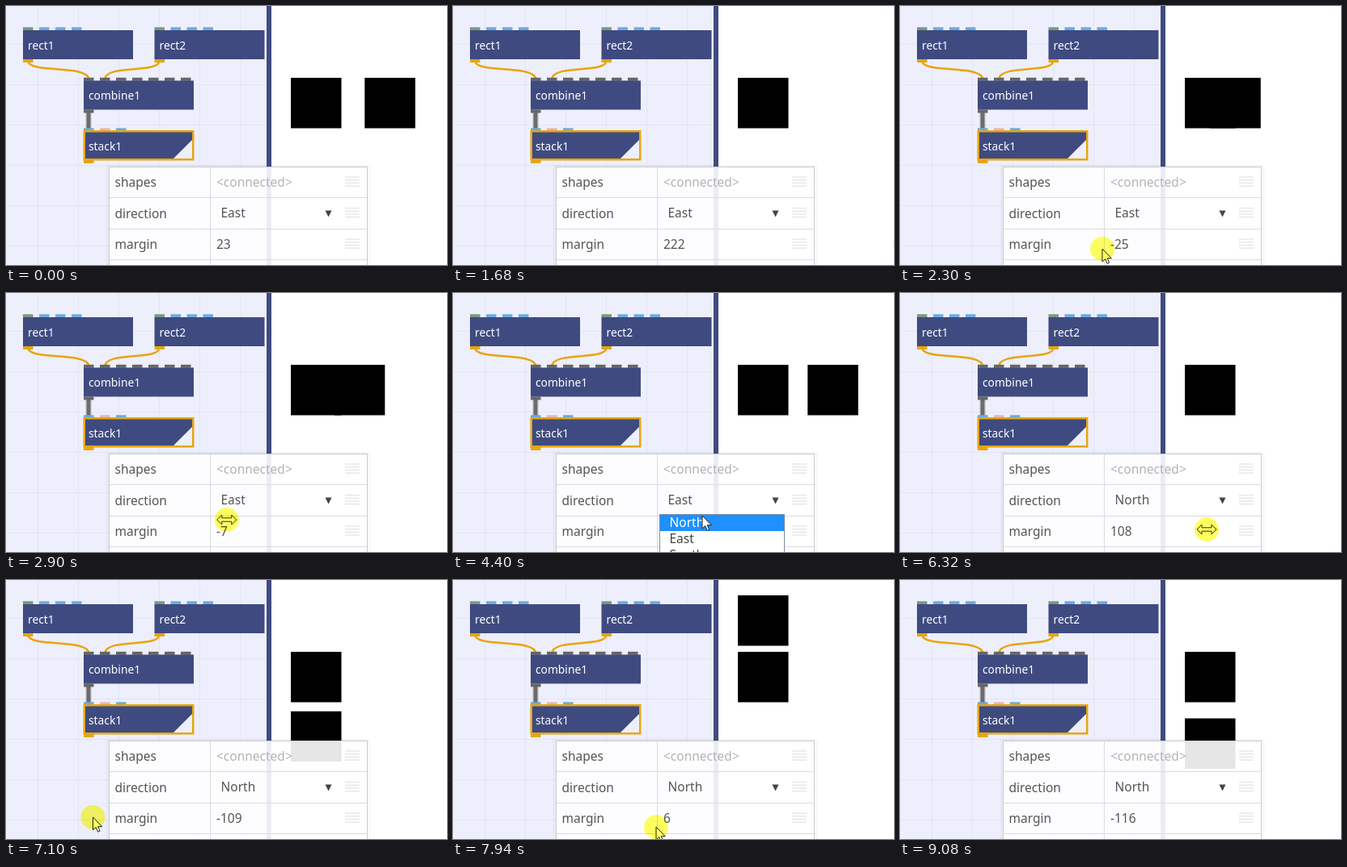
An HTML page that plays this animation: 545 px wide and 321 px high, repeating every 9470 ms.

```html
<!DOCTYPE html>
<html lang="en">
<head>
<meta charset="utf-8">
<title>Stack node</title>
<style>
  html, body { margin: 0; width: 100%; height: 100%; overflow: hidden; background: #fff; }
  svg { display: block; }
  text { font-family: "Noto Sans", "Open Sans", sans-serif; font-size: 15.5px; fill: #555; }
  .name { font-size: 13.8px; font-weight: 500; fill: #fff; }
  #halo { mix-blend-mode: multiply; }
</style>
</head>
<body>
<svg id="stage" width="545" height="321" viewBox="0 0 545 321">
  <rect width="545" height="321" fill="#fff"/>
  <rect x="352" y="89" width="62.5" height="62.5"/>
  <rect id="second" width="62.5" height="62.5"/>
  <g id="network"></g>
  <g id="panel"></g>
  <g id="menu"></g>
  <path id="arrow" d="M0 0V16L3.7 12.6L6.1 18.3L8.6 17.2L6.2 11.7H11.3Z" fill="#fff" stroke="#222"/>
  <path id="scrub" d="M-12 0L-6 -6V-2.2H6V-6L12 0L6 6V2.2H-6V6Z" fill="#fff" stroke="#333"/>
  <circle id="halo" r="15" fill="#ffff62"/>
</svg>
<script>
const LOOP = 9470, TICKS = 124, TICK = LOOP / TICKS;
const UNIT = 1.25, SIDE = 62.5;
const NODE = '#3f4b80', GOLD = '#e6a60f', GREY = '#666', BLUE = '#69ace0',
      GREEN = '#7b987c', PINK = '#e6b8b6', PAPER = '#eeeffc';
const $ = id => document.getElementById(id);

function add(parent, tag, attrs, label) {
  const el = document.createElementNS('http://www.w3.org/2000/svg', tag);
  for (const key in attrs) el.setAttribute(key, attrs[key]);
  if (label !== undefined) el.textContent = label;
  parent.appendChild(el);
  return el;
}
const box = (g, x, y, width, height, fill, more) =>
  add(g, 'rect', { x, y, width, height, fill, ...more });
const line = (g, d, stroke, width = 1) =>
  add(g, 'path', { d, stroke, fill: 'none', 'stroke-width': width });
const write = (g, x, y, label, more) => add(g, 'text', { x, y, ...more }, label);

function node(g, x, y, label, inputs, output) {
  inputs.forEach((color, i) => box(g, x + 20 * i, y - 3.7, 12.5, 4, color));
  box(g, x, y + 36, 12.5, 4, output);
  box(g, x, y, 136, 36, NODE);
  write(g, x + 6, y + 23.7, label, { class: 'name' });
}

function drawNetwork(g) {
  box(g, 0, 0, 328, 321, PAPER);
  for (let x = 39.5; x < 322; x += 50) line(g, `M${x} 0V321`, '#e3e5f2');
  for (let y = 47.5; y < 321; y += 50) line(g, `M0 ${y}H322`, '#e3e5f2');
  box(g, 322, 0, 6, 321, NODE);
  line(g, 'M102 130V153', '#d3d4dc', 8);
  line(g, 'M102 130V153', '#6b6b6b', 5);
  line(g, 'M27.3 68C27.3 84 102 72 102.3 91', GOLD, 2.5);
  line(g, 'M189.3 68C189.3 84 122.5 72 122.3 91', GOLD, 2.5);
  const shape = [GREEN, BLUE, BLUE, BLUE];
  node(g, 21, 30, 'rect1', shape, GOLD);
  node(g, 183.5, 30, 'rect2', shape, GOLD);
  node(g, 96, 92.5, 'combine1', Array(7).fill(GREY), GREY);
  node(g, 96, 155, 'stack1', [BLUE, PINK, BLUE], GOLD);
  add(g, 'path', { d: 'M207 189L231 165V189Z', fill: PAPER });
  box(g, 96.75, 155.25, 134.5, 35, 'none', { stroke: GOLD, 'stroke-width': 2.5 });
}

function drawPanel(g) {
  for (let i = 3; i > 0; i--)
    box(g, 127 - i, 199 - i / 2, 320 + 2 * i, 130, 'none', { stroke: '#000', 'stroke-opacity': 0.025 });
  box(g, 127.5, 199.5, 319, 130, '#fff', { 'fill-opacity': 0.9, stroke: '#c9c9cd' });
  line(g, 'M128 237.5H446M128 276.5H446M128 314.5H446M252.5 200V321', '#dcdce0');
  ['shapes', 'direction', 'margin'].forEach((label, i) => {
    const y = 224 + 38.5 * i;
    write(g, 134.5, y, label);
    for (let j = 0; j < 4; j++) line(g, `M419 ${y - 12 + 3.7 * j}h18`, '#e3e3e3', 1.2);
  });
  write(g, 260, 224, '<connected>', { style: 'fill:#b4b4b4' });
  add(g, 'path', { d: 'M394.5 253.5H402.5L398.5 261.5Z', fill: '#444' });
  return { direction: write(g, 265.5, 262, ''), margin: write(g, 260, 301, '') };
}

function drawMenu(g) {
  box(g, 255.5, 274.5, 154, 82, '#fff', { stroke: '#7b8ba5' });
  return ['North', 'East', 'South'].map((label, i) => ({
    bar: box(g, 256, 275 + 20 * i, 153, 20, '#1e90ff'),
    text: write(g, 267.5, 290 + 20 * i, label)
  }));
}

// Pointer path: tick, x, y
const PATH = [
  [4, 378, 302], [7, 283, 308], [9, 310, 299], [11, 310, 299], [12, 306, 297],
  [16, 151.5, 296], [22, 559, 295], [23, 559, 295], [30, 250, 301], [36, 111, 286],
  [38, 272.75, 281], [42, 305.25, 283], [47, 305.25, 283], [50, 307, 261], [57, 307, 261],
  [58, 308, 276], [60, 307, 284], [68, 307, 284], [74, 267.75, 294], [78, 267.75, 294],
  [83, 379, 293], [84, 379, 293], [95, 81.5, 294], [96, 81.5, 294], [101, 300, 305],
  [102, 300, 305], [104, 251, 306], [114, 99, 303], [116, 99, 303], [117, 324, 314]
];
// Each drag starts at a pointer x with a margin value
const DRAGS = [{ from: 11, to: 45, x: 310, margin: 23 }, { from: 76, to: 115, x: 267.75, margin: 19 }];
const CLICKS = [{ from: 52, to: 54 }, { from: 62, to: 64 }];

// Monotone cubic through the path points
function along(k, axis) {
  const last = PATH.length - 1;
  if (k <= PATH[0][0]) return PATH[0][axis];
  if (k >= PATH[last][0]) return PATH[last][axis];
  const i = PATH.findIndex(p => p[0] > k) - 1;
  const secant = j => j < 0 || j >= last ? 0 :
    (PATH[j + 1][axis] - PATH[j][axis]) / (PATH[j + 1][0] - PATH[j][0]);
  const slope = j => {
    const a = secant(j - 1), b = secant(j);
    return a * b <= 0 ? 0 : 2 * a * b / (a + b);
  };
  const p = PATH[i], q = PATH[i + 1], h = q[0] - p[0], u = (k - p[0]) / h;
  const e = u * u * (3 - 2 * u);
  return p[axis] * (1 - e) + q[axis] * e +
    h * u * (1 - u) * ((1 - u) * slope(i) - u * slope(i + 1));
}

function marginAt(k) {
  const drag = k < DRAGS[1].from ? DRAGS[0] : DRAGS[1];
  const x = along(Math.max(drag.from, Math.min(k, drag.to)), 1);
  return drag.margin + Math.round((x - drag.x) / UNIT);
}

drawNetwork($('network'));
const fields = drawPanel($('panel'));
const options = drawMenu($('menu'));
const show = (el, on) => el.setAttribute('visibility', on ? 'visible' : 'hidden');
const move = (el, x, y) => el.setAttribute('transform', `translate(${x} ${y})`);

function render(ms) {
  const k = Math.floor(ms / TICK + 0.4);
  const x = along(k, 1), y = along(k, 2);
  const margin = marginAt(k), north = k >= 64;
  const offset = SIDE + margin * UNIT;
  move($('second'), north ? 352 : 352 + offset, north ? 89 - offset : 89);
  fields.direction.textContent = north ? 'North' : 'East';
  fields.margin.textContent = margin;

  $('menu').style.display = k >= 53 && k < 64 ? '' : 'none';
  const hover = k < 58 ? 1 : 0;
  options.forEach((option, i) => {
    option.bar.setAttribute('fill-opacity', i === hover ? 1 : 0);
    option.text.style.fill = i === hover ? '#fff' : '#444';
  });

  const visible = k >= 4 && k < 119;
  const choosing = k >= 48 && k < 69;
  const inField = !choosing && x > 252 && x < 447 && y > 276;
  const pressed = [...DRAGS, ...CLICKS].some(s => k >= s.from && k < s.to);
  show($('scrub'), visible && inField);
  show($('arrow'), visible && !inField);
  show($('halo'), visible && pressed);
  for (const id of ['scrub', 'arrow', 'halo']) move($(id), x, y);
}

const start = performance.now();
function loop() {
  render((performance.now() - start) % LOOP);
  requestAnimationFrame(loop);
}
loop();
</script>
</body>
</html>
```
